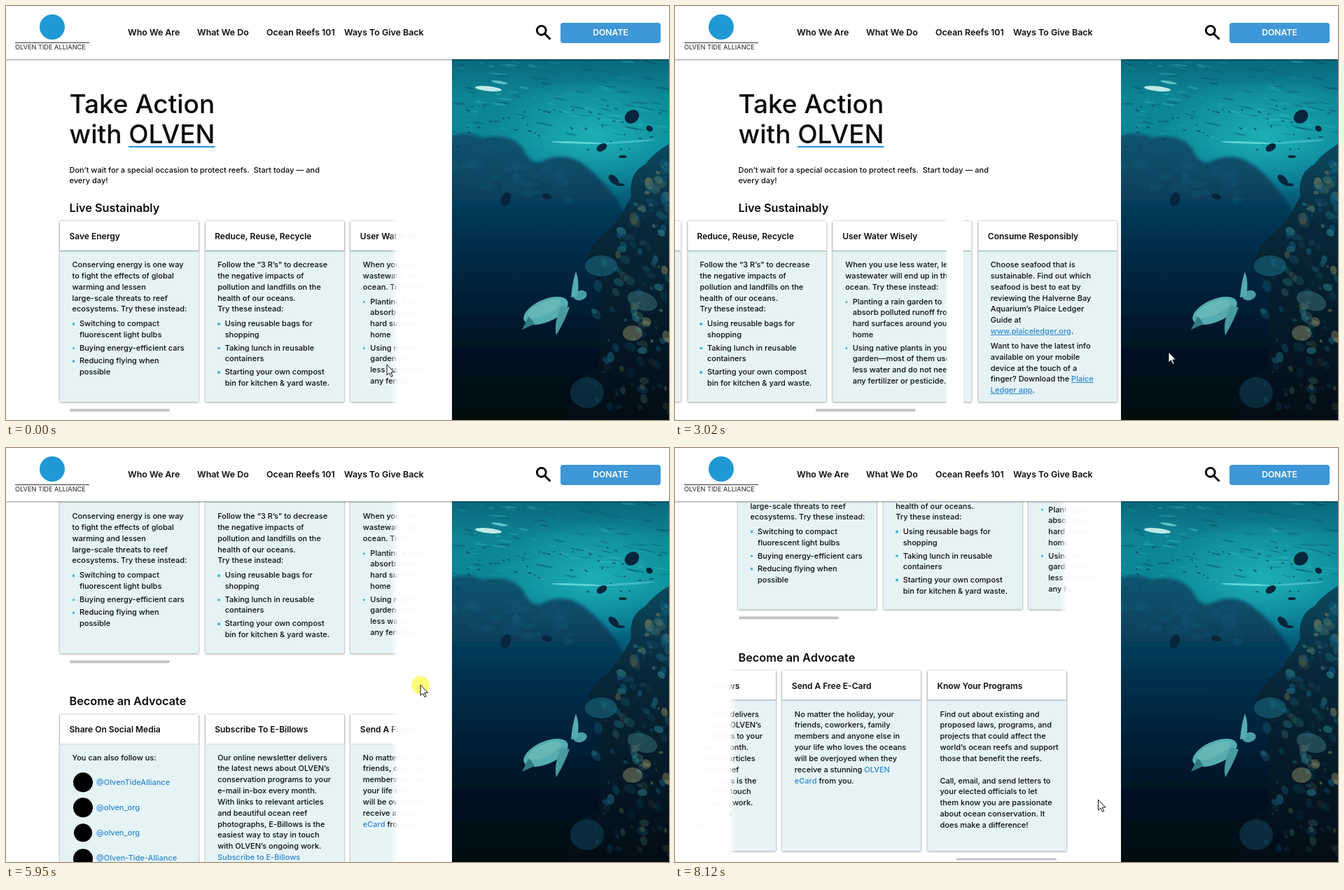
An HTML page for the animation above (8400 ms loop, 947 px wide and 591 px high).

```html
<!DOCTYPE html>
<html lang="en">
<head>
<meta charset="utf-8">
<title>Take Action</title>
<style>
  html, body { margin: 0; width: 100%; height: 100%; overflow: hidden; background: #fff; }
  #stage { position: relative; width: 947px; height: 591px; overflow: hidden; background: #fff;
    color: #0c0c0c; font: 500 11px/15.85px Inter, "Open Sans", sans-serif; white-space: nowrap; }
  #stage div, #stage svg { position: absolute; }
  #page { left: 0; top: 0; width: 947px; height: 1000px; }
  .title { left: 90.5px; top: 118px; font-size: 37px; line-height: 43.4px; }
  .title u { text-decoration: underline 2px #2b8fd6; text-underline-offset: 4px; text-decoration-skip-ink: none; }
  .intro { left: 90.5px; top: 226.5px; }
  h2 { position: absolute; left: 90.5px; margin: 0; font: 600 16.3px/20px Inter, "Open Sans", sans-serif; }
  .row { left: 0; top: 0; }
  .card { width: 198px; height: 258px; border-radius: 1px; background: #e5f3f4; box-shadow: 0 .5px 3px rgba(0,0,0,.5); }
  .card .head { left: 0; top: 0; width: 184.5px; height: 42px; padding-left: 13.5px; background: #fff;
    font-weight: 600; font-size: 12px; line-height: 43px; box-shadow: 0 1px 1.5px rgba(0,40,40,.45); }
  .card .body { left: 17.5px; top: 55px; }
  .body p { margin: 0 0 5px; }
  .body ul { list-style: none; margin: 0; padding: 0 0 0 10.5px; }
  .body li { position: relative; margin-bottom: 2.7px; }
  .body li::before { content: ""; position: absolute; left: -10.5px; top: 6.2px; width: 3.6px; height: 3.6px;
    border-radius: 50%; background: #41b0dc; }
  .body a { color: #2e87d3; }
  .body a.line { text-decoration: underline; }
  .dot { border-radius: 50%; background: #000; }
  .fade { left: 549px; width: 88px; height: 267px;
    background: linear-gradient(90deg, rgba(255,255,255,0), rgba(255,255,255,.97) 12%, #fff); }
  .bar { width: 143px; height: 3.5px; border-radius: 2px; background: #c3c3c3; }
  #photo { left: 637px; top: 76px; }
  #top { left: 0; top: 0; width: 947px; height: 76px; background: #fff; box-shadow: 0 1px 2px rgba(0,0,0,.45); }
  #top .nav { top: 28px; font-weight: 600; font-size: 12.4px; line-height: 20px; }
  #top .mark { left: 48px; top: 12px; width: 36px; height: 36px; border-radius: 50%; background: #2098d4; }
  #top .rule { left: 13px; top: 51.5px; width: 106px; height: 1px; background: #333; }
  #top .brand { left: 13px; top: 53px; font-weight: 400; font-size: 9.2px; line-height: 11px; color: #222; }
  #top .give { left: 792px; top: 24px; width: 143px; height: 28.5px; border-radius: 4px; background: #3e97d6;
    color: #fff; text-align: center; font-weight: 600; font-size: 12.2px; line-height: 28px; }
  #glow { left: -13px; top: -13px; width: 26px; height: 26px; border-radius: 50%; background: #fdfb78; }
  #cursor svg { left: -1px; top: -1px; overflow: visible; }
</style>
</head>
<body>
<div id="stage">
  <div id="page">
    <div class="title">Take Action<br>with <u>OLVEN</u></div>
    <div class="intro">Don’t wait for a special occasion to protect reefs.&nbsp; Start today — and<br>every day!</div>
    <h2 style="top:278px">Live Sustainably</h2>
    <h2 style="top:622.5px">Become an Advocate</h2>
  </div>
  <svg id="photo" width="310" height="515"></svg>
  <div id="top">
    <div class="mark"></div><div class="rule"></div><div class="brand">OLVEN TIDE ALLIANCE</div>
    <div class="nav" style="left:174px">Who We Are</div>
    <div class="nav" style="left:273px">What We Do</div>
    <div class="nav" style="left:372px">Ocean Reefs 101</div>
    <div class="nav" style="left:483px">Ways To Give Back</div>
    <svg style="left:756px;top:26px" width="24" height="24" fill="none" stroke="#000" stroke-width="2.9">
      <circle cx="8.8" cy="8.8" r="6.4"/><path d="M13.2 13.2L21.5 21.5"/></svg>
    <div class="give">DONATE</div>
  </div>
  <div id="cursor">
    <div id="glow"></div>
    <svg width="14" height="20"><path d="M1 1V16L4.5 12.8L7 18.4L9.2 17.4L6.8 12H11.4Z"
      fill="#fff" stroke="#111" stroke-width="1"/></svg>
  </div>
</div>
<script>
const $ = id => document.getElementById(id);
const br = s => s.replaceAll('|', '<br>');
const p = s => `<p>${br(s)}</p>`;
const ul = (...items) => `<ul>${items.map(s => `<li>${br(s)}</li>`).join('')}</ul>`;
const link = s => `<a>${br(s)}</a>`;
const lined = s => `<a class="line">${br(s)}</a>`;

const handles = ['@OlvenTideAlliance', '@olven_org', '@olven_org', '@Olven-Tide-Alliance'];
const social = handles.map((name, i) => {
  const y = 42.5 + i * 36.2, r = i === 2 ? 13 : 14;
  return `<div class="dot" style="left:${15 - r}px;top:${y - r}px;width:${2 * r}px;height:${2 * r}px"></div>
    <div style="left:34.5px;top:${y - 7.5}px">${link(name)}</div>`;
}).join('');

const living = [
  ['Save Energy', p('Conserving energy is one way|to fight the effects of global|warming and lessen|large-scale threats to reef|ecosystems. Try these instead:') +
    ul('Switching to compact|fluorescent light bulbs', 'Buying energy-efficient cars', 'Reducing flying when|possible')],
  ['Reduce, Reuse, Recycle', p('Follow the “3 R’s” to decrease|the negative impacts of|pollution and landfills on the|health of our oceans.|Try these instead:') +
    ul('Using reusable bags for|shopping', 'Taking lunch in reusable|containers', 'Starting your own compost|bin for kitchen &amp; yard waste.')],
  ['User Water Wisely', p('When you use less water, less|wastewater will end up in the|ocean. Try these instead:') +
    ul('Planting a rain garden to|absorb polluted runoff from|hard surfaces around your|home', 'Using native plants in your|garden—most of them use|less water and do not need|any fertilizer or pesticide.')],
  ['Consume Responsibly', p(`Choose seafood that is|sustainable. Find out which|seafood is best to eat by|reviewing the Halverne Bay|Aquarium’s Plaice Ledger|Guide at|${lined('www.plaiceledger.org')}.`) +
    p(`Want to have the latest info|available on your mobile|device at the touch of a|finger? Download the ${lined('Plaice|Ledger app')}.`)],
  ['Ocean Is Already A Gift', p('Don’t buy shell jewelry or|household goods made from|marine life—that includes|shells! Harvesting these|species can cause significant|habitat destruction or|dramatically reduce|populations.')],
  ['Scuba Gear', p(`Shopping at online scuba|retailer — and OLVEN partner|— ${lined('OrvinDives')}. Consider|making a donation to OLVEN|at the end of the transaction,|providing much-needed|funding for our conservation|work.`)],
];
const advocacy = [
  ['Share On Social Media', p('You can also follow us:') + social],
  ['Subscribe To E-Billows', p(`Our online newsletter delivers|the latest news about OLVEN’s|conservation programs to your|e-mail in-box every month.|With links to relevant articles|and beautiful ocean reef|photographs, E-Billows is the|easiest way to stay in touch|with OLVEN’s ongoing work.|${link('Subscribe to E-Billows')}|today—it’s free.`)],
  ['Send A Free E-Card', p(`No matter the holiday, your|friends, coworkers, family|members and anyone else in|your life who loves the oceans|will be overjoyed when they|receive a stunning ${link('OLVEN|eCard')} from you.`)],
  ['Know Your Programs', p('Find out about existing and|proposed laws, programs, and|projects that could affect the|world’s ocean reefs and support|those that benefit the reefs.||Call, email, and send letters to|your elected officials to let|them know you are passionate|about ocean conservation. It|does make a difference!')],
];

// A carousel: sliding cards, an edge fade that flips sides, and a scroll bar.
function carousel(cards, top, barX, travel, barTravel) {
  const add = (cls, css, html = '') => {
    const el = document.createElement('div');
    el.className = cls;
    el.style.cssText = css;
    el.innerHTML = html;
    $('page').append(el);
    return el;
  };
  const row = add('row', '', cards.map(([head, body], i) =>
    `<div class="card" style="left:${77 + i * 207.67}px;top:${top}px">
      <div class="body">${body}</div><div class="head">${head}</div></div>`).join(''));
  const fade = add('fade', `top:${top - 4}px`);
  const bar = add('bar', `left:${barX}px;top:${top + 268}px`);
  return (k, shift = 0) => {
    row.style.transform = `translateX(${shift - travel * k}px)`;
    fade.style.transform = `translateX(${-549 * k}px) scaleX(${1 - 2 * k})`;
    bar.style.transform = `translateX(${barTravel * k}px)`;
  };
}
const slideLiving = carousel(living, 307, 90.5, 754.3, 310.5);
const slideAdvocacy = carousel(advocacy, 651.5, 77, 339, 325);

// Underwater scene
(function paintReef() {
  let seed = 7;
  const rnd = (a, b) => {
    seed = (seed * 16807) % 2147483647;
    return a + (b - a) * seed / 2147483647;
  };
  const many = (n, f) => Array.from({ length: n }, f).join('');
  const oval = (x, y, rx, ry, turn, fill, o = 1) =>
    `<ellipse rx="${rx}" ry="${ry}" fill="${fill}" opacity="${o}" transform="translate(${x} ${y}) rotate(${turn})"/>`;
  const stops = list => list.map(([o, c, a = 1]) => `<stop offset="${o}" stop-color="${c}" stop-opacity="${a}"/>`).join('');
  const hues = ['#1d6a7c', '#17526b', '#2a7f8a', '#123f5c', '#4d7a72', '#0e5a78', '#7f7f58'];

  const ripples = many(110, () => {
    const y = rnd(2, 112);
    return oval(rnd(0, 310), y, rnd(3, 14), rnd(.5, 1.6), rnd(2, 16), rnd(0, 1) < .55 ? '#3cc0c6' : '#05495e', rnd(.15, .45));
  });
  const edge = y => y < 215 ? 310 - (y - 125) * .7 : y < 300 ? 248 - (y - 215) * .55 : 202 - (y - 300) * .12;
  const clumps = many(150, () => {
    const y = rnd(150, 505), x = rnd(edge(y) + 8, 310), r = rnd(2, 9);
    return oval(x, y, r, r * .7, rnd(0, 90), hues[Math.floor(rnd(0, hues.length))], rnd(.15, .65) * (y > 430 ? .5 : 1));
  });
  const crags = many(45, () => {
    const x = rnd(0, 200);
    return oval(x, 122 + x * .2 + rnd(0, 50), rnd(4, 11), rnd(3, 8), 0, '#125874', rnd(.12, .4));
  });
  const shoal = many(45, () => oval(rnd(0, 300), rnd(65, 130), rnd(1, 3), .9, rnd(-20, 40), '#06394f', .75));
  const fish = [[257, 82, 11, 9, -40], [214, 126, 8, 5, -30], [231, 172, 9, 5, 45], [77, 200, 7, 10, 20],
    [136, 196, 7, 4, 15], [282, 99, 5, 4, 30], [244, 139, 6, 2, 0], [240, 179, 7, 2, 5]]
    .map(f => oval(...f, '#07253c')).join('');

  $('photo').innerHTML = `
    <defs>
      <linearGradient id="sea" x2="0" y2="1">${stops([[0, '#08687c'], [.1, '#0e8493'], [.24, '#0b8797'], [.34, '#087089'],
        [.46, '#06405f'], [.6, '#042340'], [.75, '#021220'], [1, '#010810']])}</linearGradient>
      <radialGradient id="sun">${stops([[0, '#22bcc0', .75], [1, '#22bcc0', 0]])}</radialGradient>
      <linearGradient id="far" x2="0" y2="1">${stops([[0, '#0a4f6c', .9], [.35, '#06304e', .9], [.8, '#021020', .8], [1, '#01080f', .9]])}</linearGradient>
      <linearGradient id="near" x2="0" y2="1">${stops([[0, '#0b4a60'], [.3, '#08283a'], [1, '#020c15']])}</linearGradient>
      <filter id="soft"><feGaussianBlur stdDeviation="2"/></filter>
    </defs>
    <rect width="310" height="515" fill="url(#sea)"/>
    <ellipse cx="205" cy="110" rx="150" ry="85" fill="url(#sun)"/>
    ${ripples}
    ${oval(52, 42, 19, 3.5, 6, '#d3f6f2', .9)}${oval(68, 33, 12, 2, 10, '#7fe0df', .7)}
    ${oval(178, 119, 36, 1.6, 2, '#6fdede', .8)}${oval(250, 118, 40, 1.6, -4, '#58cfd2', .6)}
    <path filter="url(#soft)" fill="url(#far)" d="M-9 112Q20 100 44 112Q84 104 102 128Q112 152 128 146Q160 130 188 150
      Q212 168 232 196Q250 220 262 262L240 520H-9Z"/>
    ${crags}
    <path fill="url(#near)" d="M312 120Q290 132 276 150Q252 162 256 196Q240 228 222 246Q196 262 190 296Q214 316 210 346
      Q212 392 210 440Q176 452 170 484Q162 500 164 516H312Z"/>
    ${clumps}
    ${oval(193, 476, 24, 22, 0, '#12435a', .55)}${oval(213, 295, 23, 15, 0, '#1b6d88', .55)}
    ${oval(258, 391, 14, 11, 0, '#8d8c68', .5)}${oval(272, 345, 22, 13, 20, '#3e7780', .5)}
    ${shoal}${fish}
    <g fill="#55adaf">
      ${oval(134, 359, 34, 16, -24, '#55adaf')}
      ${oval(183, 337, 10, 7, -15, '#4a9da2')}
      <path d="M170 340Q172 318 177 303Q183 318 179 338Z"/>
      <path d="M156 352L168 354Q162 372 149 394Q145 376 156 352Z" fill="#479ba0"/>
      <path d="M110 366L100 386L118 378Z" fill="#2f7c86"/>
    </g>
    ${oval(132, 356, 26, 9, -24, '#79c3bf', .5)}`;
})();

const LOOP = 8400;
// Rows are [time, value, value...], joined linearly.
const pointer = [
  [0, 544, 512], [70, 548, 508], [290, 535, 485], [510, 440, 480], [660, 360, 488], [1100, 215, 506], [1440, 199, 509],
  [1520, 199, 509], [1600, 225, 540], [1680, 280, 605], [1850, 455, 605], [1975, 505, 578], [2080, 535, 605],
  [2200, 190, 605], [2290, 150, 560], [2420, 150, 505], [2650, 330, 492], [2880, 640, 492], [3020, 705, 494],
  [3720, 705, 494], [3870, 610, 555], [3960, 535, 605], [4280, 610, 605], [4480, 597, 584], [5100, 597, 584],
  [5250, 597, 565], [5410, 597, 512], [5640, 593, 368], [5790, 592, 346], [5950, 592, 338.5], [6180, 592, 300],
  [6560, 592, 300], [6700, 480, 440], [6860, 267, 495.5], [7000, 195, 502], [7400, 195, 502], [7800, 480, 506],
  [8120, 604.5, 502], [LOOP, 604.5, 502]];
const scroll = [[0, 0], [5060, 0], [5250, 25], [5410, 82.5], [5640, 238], [5790, 263], [5950, 271.3],
  [6070, 316], [6190, 334.5], [LOOP, 334.5]];

function at(track, t) {
  const i = Math.max(1, track.findIndex(k => k[0] >= t));
  const a = track[i - 1], b = track[i], f = (t - a[0]) / (b[0] - a[0]);
  return a.slice(1).map((v, j) => v + (b[j + 1] - v) * f);
}
const ease = (t, from, to) => 1 - (1 - Math.min(1, Math.max(0, (t - from) / (to - from)))) ** 4;

function draw() {
  const t = performance.now() % LOOP;
  const [x, y] = at(pointer, t);
  const k = ease(t, 6880, 7730);
  $('page').style.transform = `translateY(${-at(scroll, t)[0]}px)`;
  slideLiving(ease(t, 600, 1450) - ease(t, 2815, 3715), 13 * k);
  slideAdvocacy(k);
  $('cursor').style.transform = `translate(${x}px, ${y}px)`;
  $('glow').style.display = t >= 5080 && t < 6390 ? 'block' : 'none';
  requestAnimationFrame(draw);
}
draw();
</script>
</body>
</html>
```
